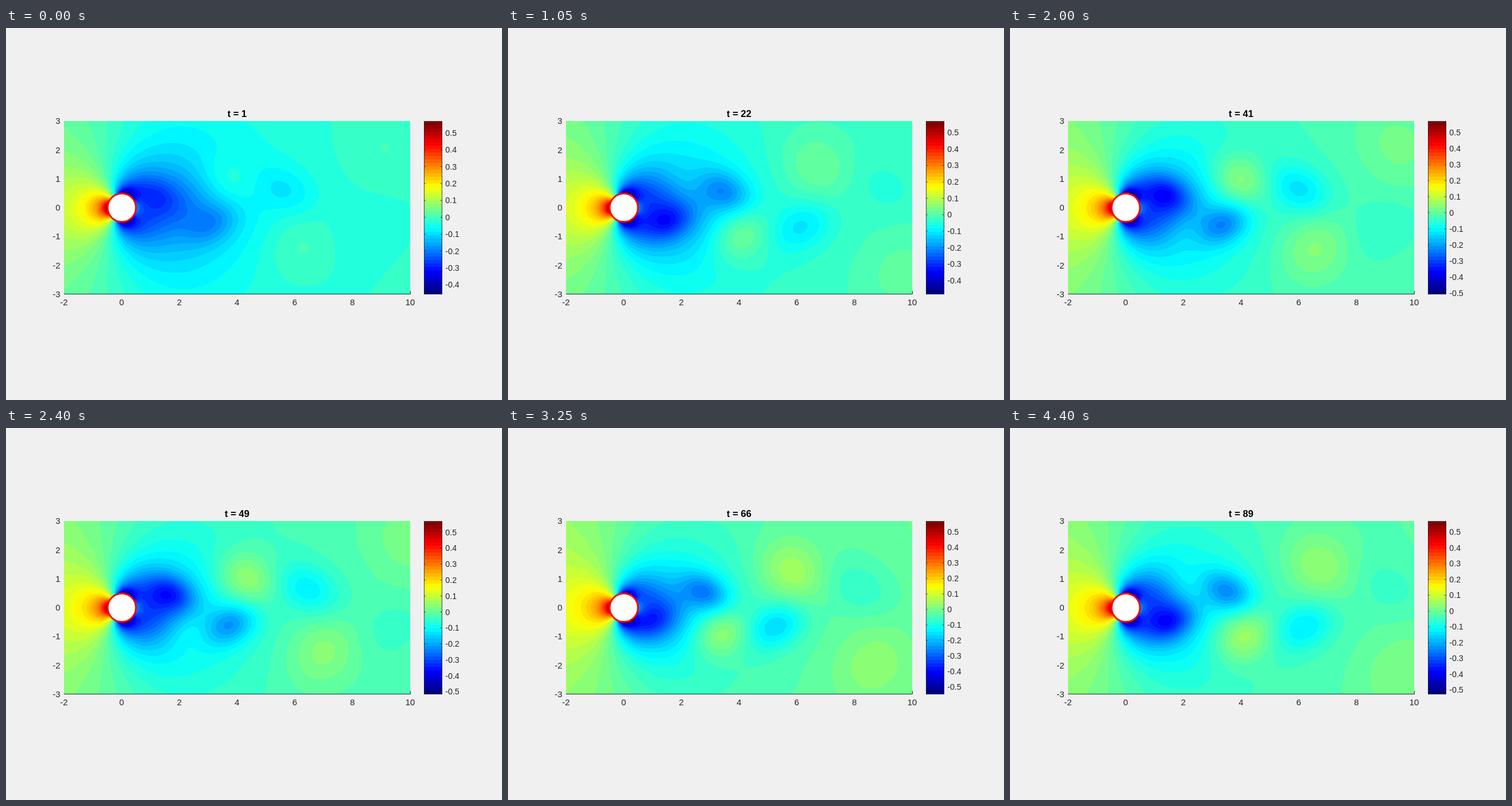
These frames come from a looping animation (864 px wide and 648 px high, 4.45 s). An HTML page with a canvas:

```html
<!DOCTYPE html>
<html lang="en">
<head>
<meta charset="utf-8">
<title>Cylinder wake pressure</title>
<style>
html, body { margin: 0; width: 100%; height: 100%; overflow: hidden; background: #f0f0f0; }
canvas { position: absolute; left: 101px; top: 162px; }
svg { position: absolute; left: 0; top: 0; }
text { font-family: "Liberation Sans", Arial, sans-serif; font-size: 15px; fill: #262626; }
#title { font-size: 16.6px; font-weight: bold; fill: #000; }
#scale text { font-size: 14.2px; }
</style>
</head>
<body>
<canvas id="field" width="603" height="302"></canvas>
<svg width="864" height="648" viewBox="0 0 864 648">
  <text id="title" x="402.5" y="155" text-anchor="middle"></text>
  <path d="M101 463.5H704.5V458" fill="none" stroke="#262626"/>
  <circle cx="201.7" cy="313" r="24.7" fill="#fff" stroke="#f00" stroke-width="3"/>
  <g id="axes"></g>
  <g id="bands" shape-rendering="crispEdges"></g>
  <rect x="728.5" y="162.5" width="31" height="301" fill="none" stroke="#262626" stroke-width=".8"/>
  <g id="scale"></g>
</svg>
<script>
const FRAME_MS = 50, FRAMES = 89, LEVELS = 50;
const UNIT = 50.25, CX = 100.6, CY = 151, STEP = 2;
const BAR_TOP = 162.5, BAR_H = 301, P_MAX = 0.569;
const W = 603, H = 302, COLS = Math.ceil(W / STEP) + 1, ROWS = Math.ceil(H / STEP) + 1;

// Slow development of the wake at a few instants
const TIMES = [1, 22, 41, 57, 66, 80, 89];
const PHASE = [0, 5.18, 10.13, 14.44, 16.87, 20.70, 23.19];
const GROWTH = [0.42, 0.74, 0.9, 0.97, 1, 1, 1];
const SUCTION = [0.457, 0.493, 0.518, 0.534, 0.54, 0.54, 0.54];

const byId = id => document.getElementById(id);
const clamp = (v, a = 0, b = 1) => Math.min(b, Math.max(a, v));
const smooth = (a, b, v) => { const u = clamp((v - a) / (b - a)); return u * u * (3 - 2 * u); };
const mod = (a, n) => ((a % n) + n) % n;

function along(values, t) {
  let i = 0;
  while (i < TIMES.length - 2 && t > TIMES[i + 1]) i++;
  return values[i] + (values[i + 1] - values[i]) * (t - TIMES[i]) / (TIMES[i + 1] - TIMES[i]);
}

const palette = Array.from({ length: LEVELS }, (_, k) => {
  const v = k / (LEVELS - 1);
  return [3, 2, 1].map(c => Math.round(255 * clamp(1.5 - Math.abs(4 * v - c))));
});

// Distance travelled by a vortex, in half shedding periods
const travel = s => 0.72 + 1.6 * s + 0.52 * Math.log(1 + Math.exp((s - 1.37) / 0.4));

function makeBlobs(phase, growth) {
  const blobs = [];
  for (const side of [1, -1]) {
    const first = mod(phase + (side > 0 ? 0.3 : 1.3), 2);
    for (let s = first - 2; s < 6; s += 2) {
      const x = travel(s), xh = x + 0.5;
      const low = -0.15 * smooth(-0.5, 0.7, s) * Math.exp(-(((x - 3) / 4.8) ** 2));
      const high = 0.125 * smooth(0.8, 3.8, xh) * Math.exp(-Math.max(0, xh - 4) / 5.5);
      if (low) blobs.push({ x, y: side * (0.47 + 0.027 * x), a: 0.6 + 0.07 * x,
        b: 0.5 + 0.06 * x, skew: side * 0.35, amp: low * growth });
      if (high) blobs.push({ x: xh, y: -side * (0.7 + 0.0165 * xh * xh), a: 0.7 + 0.08 * xh,
        b: 0.55 + 0.1 * xh, skew: -side * 0.15, amp: high * growth });
    }
  }
  return blobs;
}

function wakeState(t) {
  const phase = along(PHASE, t), growth = along(GROWTH, t), suction = along(SUCTION, t);
  return {
    growth,
    extra: 0.75 * (suction - 0.457),
    lift: 0.03 * growth * Math.cos(Math.PI * (phase - 0.7)),
    min: -suction - 0.014 * growth * Math.cos(2 * Math.PI * (phase - 0.7)),
    blobs: makeBlobs(phase, growth)
  };
}

function pressure(x, y, w) {
  const r = Math.max(0.5, Math.hypot(x, y)), q = 0.25 / (r * r);
  const c = -x / r, sin2 = 1 - c * c;
  let p = c * (0.15 / r + 0.1 * r / (r * r + 1)) + 0.32 * (2 * c * c - 1) * q;
  p -= (0.03 + w.extra * sin2) * q * q;
  p += w.lift * (y / r) * Math.pow(0.5 / r, 1.5);
  const length = x < 0.9 ? 1.3 : 1.3 + 2 * (1 - w.growth);
  p -= (0.05 + 0.1 * w.growth) * Math.exp(-(((x - 0.9) / length) ** 2) - (y / 1.2) ** 2);
  p -= 0.05 * Math.exp(-(((x - 1.8) / 2.5) ** 2) - (y / 3.2) ** 2);
  for (const b of w.blobs) {
    const dy = y - b.y, dx = x - b.x + b.skew * dy;
    const e = (dx / b.a) ** 2 + (dy / b.b) ** 2;
    if (e < 10) p += b.amp * Math.exp(-e);
  }
  return p;
}

const ctx = byId("field").getContext("2d");
const image = ctx.createImageData(W, H);
const grid = new Float32Array(COLS * ROWS);

function drawField(w) {
  for (let j = 0; j < ROWS; j++)
    for (let i = 0; i < COLS; i++)
      grid[j * COLS + i] = pressure((i * STEP - CX) / UNIT, (CY - j * STEP) / UNIT, w);

  const gain = LEVELS / (P_MAX - w.min), data = image.data;
  for (let y = 0, o = 0; y < H; y++) {
    const j = Math.floor(y / STEP), v = y / STEP - j;
    for (let x = 0; x < W; x++, o += 4) {
      const i = Math.floor(x / STEP), u = x / STEP - i, k = j * COLS + i;
      const top = grid[k] + (grid[k + 1] - grid[k]) * u;
      const bottom = grid[k + COLS] + (grid[k + COLS + 1] - grid[k + COLS]) * u;
      const p = top + (bottom - top) * v;
      const rgb = palette[clamp(Math.floor((p - w.min) * gain), 0, LEVELS - 1)];
      data[o] = rgb[0]; data[o + 1] = rgb[1]; data[o + 2] = rgb[2]; data[o + 3] = 255;
    }
  }
  ctx.putImageData(image, 0, 0);
}

const label = (x, y, text, anchor) => `<text x="${x}" y="${y}" text-anchor="${anchor}">${text}</text>`;

function drawScale(min) {
  let out = "";
  for (let n = -5; n <= 5; n++) {
    const value = n / 10;
    if (value < min) continue;
    const y = BAR_TOP + BAR_H * (P_MAX - value) / (P_MAX - min);
    out += `<path d="M756.5 ${y}H760M728 ${y}H731" stroke="#262626" stroke-width=".8"/>`;
    out += label(765.3, y + 5, value, "start");
  }
  byId("scale").innerHTML = out;
}

function drawStatic() {
  let out = "";
  for (let x = -2; x <= 10; x += 2) out += label(201.5 + x * UNIT, 482.5, x, "middle");
  for (let y = -3; y <= 3; y++) out += label(94.5, 318 - y * UNIT, y, "end");
  byId("axes").innerHTML = out;
  const h = BAR_H / LEVELS;
  byId("bands").innerHTML = palette.map((c, k) =>
    `<rect x="728" y="${BAR_TOP + BAR_H - (k + 1) * h}" width="32" height="${h + 0.3}" fill="rgb(${c})"/>`).join("");
}

let shown = 0;
function render(now) {
  const t = 1 + Math.floor(now / FRAME_MS) % FRAMES;
  if (t !== shown) {
    shown = t;
    const w = wakeState(t);
    drawField(w);
    drawScale(w.min);
    byId("title").textContent = "t = " + t;
  }
}

drawStatic();
let start;
function tick(now) {
  start ??= now;
  render(Math.max(0, now - start));
  requestAnimationFrame(tick);
}
render(0);
requestAnimationFrame(tick);
</script>
</body>
</html>
```
